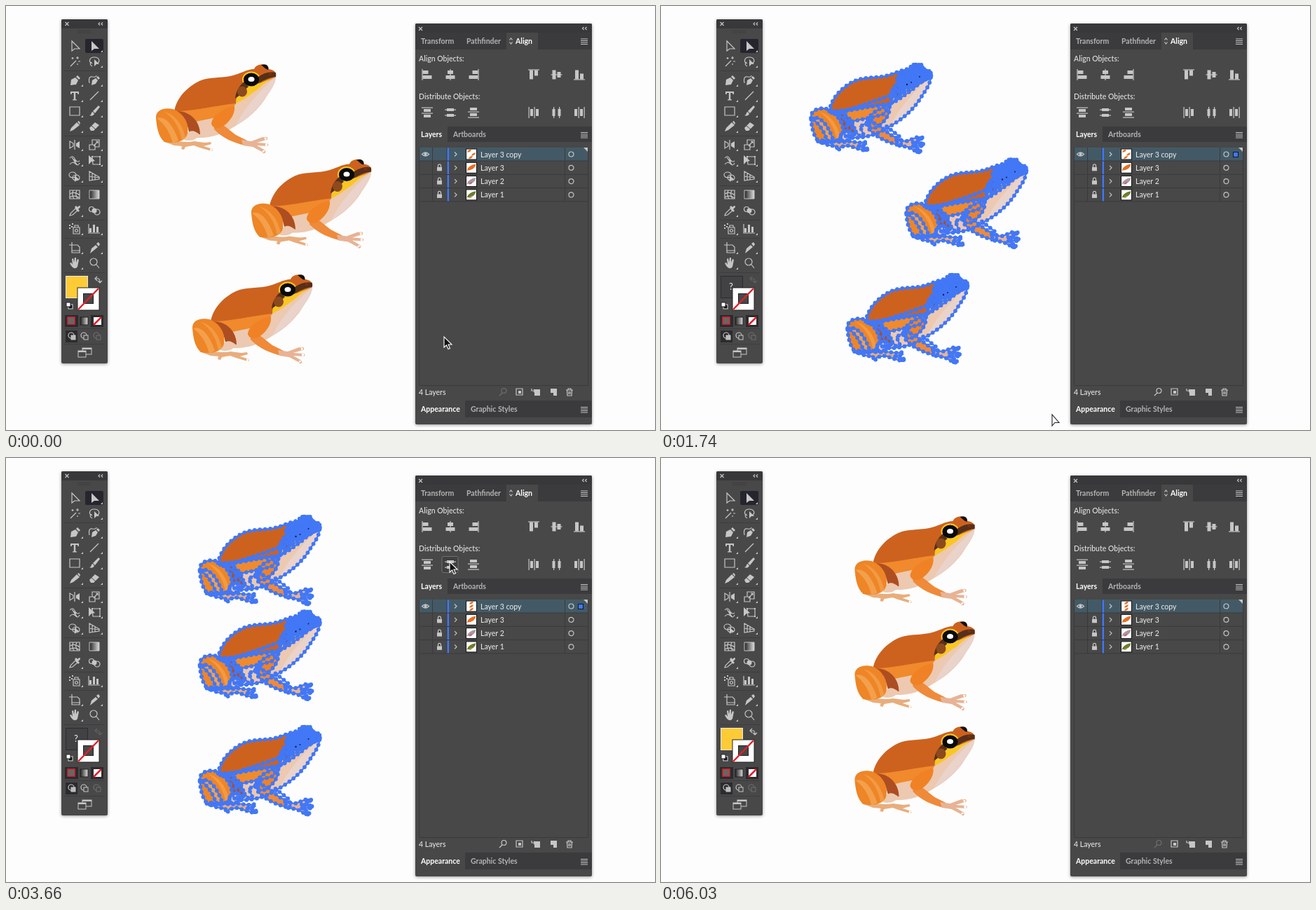
These frames come from a looping animation (926x605 px, 6.06 s). An HTML page:

```html
<!DOCTYPE html>
<html>
<head>
<meta charset="utf-8">
<style>
html, body { margin: 0; width: 100%; height: 100%; overflow: hidden; background: #fdfdfd; }
svg { display: block; }
text { font: 500 10.5px Lato, "Open Sans", sans-serif; fill: #e2e2e2; }
.b { font-weight: 700; }
.line { fill: none; stroke: #c6c6c6; stroke-width: 1.2; }
.solid { fill: #c6c6c6; }
.shadow { filter: drop-shadow(0 1px 2px #0006); }
</style>
</head>
<body>
<svg id="stage" width="926" height="605" viewBox="0 0 926 605"></svg>
<script>
const PANEL = '#484848', BAR = '#3b3b3d', DARK = '#38383a', BLUE = '#4277f6';
const stage = document.getElementById('stage');

const rect = (x, y, w, h, fill, extra = '') => `<rect x="${x}" y="${y}" width="${w}" height="${h}" fill="${fill}" ${extra}/>`;
const path = (d, extra = 'class="line"') => `<path d="${d}" ${extra}/>`;
const text = (x, y, s, extra = '') => `<text x="${x}" y="${y}" ${extra}>${s}</text>`;
const group = (x, y, s, extra = '') => `<g transform="translate(${x} ${y}) ${extra}">${s}</g>`;
const oval = (x, y, rx, ry = rx) => `M${x - rx} ${y}a${rx} ${ry} 0 1 0 ${2 * rx} 0a${rx} ${ry} 0 1 0 ${-2 * rx} 0Z`;
const line = d => path(d);
const solid = d => path(d, 'class="solid"');

// Frog: colour, shape, and whether its outline stays hidden when selected
const frogShapes = [
  ['#ecc9b0', 'M262 150C290 140 330 130 385 100C385 112 376 122 370 132C360 148 344 162 326 172C308 184 290 189 268 188Z'],
  ['#e9d3cb', 'M385 101C385 112 376 122 366 136C356 150 342 162 328 170C338 150 352 130 385 101Z', 1],
  ['#cd621f', 'M240 150C243 134 254 118 276 107C290 101 304 103 320 100C334 97 344 90 354 90C357 82 371 81 375 90C382 91 387 95 385 101C372 108 352 118 340 128L326 141C300 142 268 149 246 154Z'],
  ['#f08a2c', 'M243 150C268 150 300 142 328 139L318 154C300 160 282 162 268 166C260 158 252 154 243 150Z'],
  ['#ad4d22', 'M242 150C262 149 277 164 277 183L262 186C260 168 254 157 242 150Z'],
  ['#ecc9b0', 'M254 191C257 179 265 173 277 184C272 190 264 194 254 191Z'],
  ['#e9ad7c', 'M224 193C240 191 256 196 268 193L284 195L292 194L293 197L282 200L295 204L293 207L276 202L268 199L256 201L254 205L250 204L251 200L240 199Z' + oval(293, 205, 2)],
  ['#ee8526', 'M214 160C213 149 225 144 238 147C252 152 262 166 259 182C256 194 240 197 226 194C217 186 215 172 214 160Z'],
  ['#f3a04c', 'M215 160C226 156 238 168 246 192L238 196C234 180 226 168 215 160Z'],
  ['#f29a44', 'M226 151C240 154 252 168 256 188L251 192C248 174 240 160 226 151Z', 1],
  ['#ef8a3a', 'M297 167C306 164 316 175 328 184L344 192L342 199C326 196 308 188 297 176Z'],
  ['#f08225', 'M326 143C312 144 294 156 293 168C295 176 305 176 312 170C322 162 327 152 326 143Z'],
  ['#e8b394', 'M336 191L350 193L366 187L372 188L371 191L358 195L373 196L373 200L358 199L370 206L367 209L352 201L338 199Z' + oval(371, 189, 2.2) + oval(372, 198, 2.3) + oval(368, 208, 2.3)],
  ['#f9c623', 'M384 101C374 106 366 112 358 120C348 126 340 134 328 139C328 130 331 122 340 116C352 116 366 108 384 101Z'],
  ['#f9c623', oval(350, 105, 13, 11.5)],
  ['#55301a', 'M360 101C368 96 376 93 385 95L385 101C374 102 366 107 359 111Z'],
  ['#55301a', 'M340 108C333 113 328 122 327 132L334 127C338 122 342 119 346 115Z'],
  ['#8d4a1f', oval(337, 122, 7, 7.5)],
  ['#14100e', 'M364 84C372 81 376 87 374 91C370 90 368 87 364 84Z'],
  ['#0b0b0b', oval(350, 105, 11, 9.5)],
  ['#ffffff', oval(350, 104.5, 4.5, 3.5)],
  ['#7c2d18', oval(377, 97, 2.5, 2)]
];
const head = 'M339 104C345 95 352 91 356 90L360 84H371L375 91L385 95L383 103L364 109L348 114L338 113Z';
const innerLines = 'M300 163L284 172L290 186M268 168L284 186M322 172L340 186M230 192L256 192';
const fills = frogShapes.map(([c, d]) => path(d, `fill="${c}"`)).join('');
const outlines = [...frogShapes.filter(s => !s[2]).map(s => s[1]), head, innerLines].map(d => path(d)).join('');
const anchors = `<g fill="none" stroke="${BLUE}" stroke-linecap="round">` +
  [['2.2', 'none'], ['5.8', '0 7.5']].map(([w, dash]) =>
    outlines.replaceAll('class="line"', `stroke-width="${w}" stroke-dasharray="${dash}"`)).join('') + '</g>';
const specks = path(oval(351, 112, 1.2) + oval(357, 109, 1) + oval(369, 101, 1), 'fill="#182040"');
const frogDefs = `<g id="frog">${fills}</g><g id="picked">${fills}${path(head, `fill="${BLUE}"`)}${anchors}${specks}</g>`;

// Tool palette
const arrow = 'M-4-7L7 4H0L-4 7Z';
const box = 'M-7-6H7V6H-7Z';
const nib = 'M-6 7L-5-1L1-4L5 0L2 6ZM2-5L4-7L8-3L6-1Z';
const tools = [
  line(arrow), solid(arrow),
  line('M-6 7L2-1M4-7v4M2-5h4M-3-6v3M-4.5-4.5h3M5 0h3M4 3v2'), line('M-3 3C-9 1-7-6 0-6S9 0 4 3M-4 1q-4 3 1 6') + solid('M0-3L7 4H3L0 7Z'),
  solid(nib), solid('M-4 7L-3 0L2-3L5 0L2 5ZM3-4L5-6L8-3L6-1Z') + line('M-7 4Q-9-6-3-5T3-7'),
  solid('M-6-6H6V-2H4.500L4-4H1.200V5L3 5.500V6.500H-3V5.500L-1.200 5V-4H-4L-4.500-2H-6Z'), line('M-6 6L6-6'),
  line(box), solid('M6-8L8-6L1 3L-2 0ZM-2 1L0 4Q-2 8-7 6Q-4 5-4 2Z'),
  solid('M-7 7L-5 2L3-6L7-2L-2 5ZM4-7L6-8L8-5L7-3Z'), solid('M-7 2L1-6L7-2L-1 6H-5Z') + path('M-4-1L2 4', `stroke="${PANEL}"`),
  line('M-7-5V5L-2 2V-2ZM0-7V7') + solid('M7-5V5L2 2V-2Z'), line('M-7 0H1V7H-7ZM-3 0V-7H7V3H1M-1 2L5-5M2-5H5V-2'),
  line('M-7-3Q-3-8 0-2T7 1M-7 6Q-3 1 1 5T7 4M-4-4L3 6') + solid('M-2-2L3 1L0 4Z'), line('M-3-5H8V6H-2Z') + solid('M-8-7L1 1L-4 2L-8 6Z') + solid('M-4-6h2v2h-2zM7-6h2v2h-2zM7 5h2v2h-2z'),
  line(oval(-3, -2, 5, 4) + oval(2, 2, 5, 4)) + solid('M0-1L7 5H3L0 8Z'), line('M-7-7V6L7 4V1ZM-7 0L7 2M-3-5V5M1-2V5'),
  line(box + 'M-7-1Q0-5 7 1M-7 4Q0 0 7 5M-2-6Q-5 0-1 6M3-6Q0 0 4 6'), path(box, 'fill="url(#shade)" stroke="#c6c6c6"'),
  line('M-7 7L-6 4L1-3L4 0L-3 6Z') + solid('M0-5L2-7L4-5Q8-9 8-5L5-2L7 0L5 2Z'), line(oval(-4, -2, 3.5) + oval(4, 2, 4)) + solid(oval(0, 0, 3.5)),
  line('M-2-2H7V7H-2ZM0-2V-5H5V-2') + line(oval(2.5, 2.5, 2)) + solid('M-8-6h2v2h-2zM-5-4h2v2h-2zM-8-2h2v2h-2zM-4-8h2v2h-2z'), solid('M-7-1h3v6h-3zM-2-6h3v11h-3zM3-3h3v8h-3z') + line('M-8-7V6H8'),
  line('M-4-8V4H8M-8-4H4L7-1V7H-4V4'), solid('M-6 8L-4 1L2-4L5-1ZM3-6L6-8L8-5L6-2Z'),
  solid('M-7 0L-5-1L-3 2L-4-6L-2-7L-1-1L0-8L2-8L2-1L4-6L6-5L4 5Q2 8-1 7Q-4 6-7 0Z'), line(oval(-1, -2, 5) + 'M3 2L7 7')
];
const rows = [57, 79, 106, 128, 150, 172, 198, 220, 243, 269, 292, 318, 345, 367];
const noFlyout = [0, 2, 18, 19, 21, 27];
const toolIcons = tools.map((icon, i) => group(i % 2 ? 126 : 98, rows[i >> 1],
  icon + (noFlyout.includes(i) ? '' : solid('M12 6V9H9Z')))).join('');
const closeMark = (x, y) => line(`M${x - 2.5} ${y - 2.5}l5 5m0-5l-5 5`);
const chevrons = (x, y) => line(`M${x - 1} ${y - 2}l-2 2l2 2m4-4l-2 2l2 2`);
const red = 'stroke="#e3202b" stroke-width="2.5"';

const palette = '<g class="shadow">' + rect(79, 19, 66, 491, PANEL, 'rx="2"') + '</g>' +
  rect(79, 19, 66, 13, DARK, 'rx="2"') + closeMark(87, 25.5) + chevrons(135, 25.5) +
  path('M102 35.500H122M102 38H122', 'stroke="#333" stroke-dasharray="1 1"') +
  [92.5, 185.5, 256.5, 305.5, 331.5, 380.5, 460.5, 482.5].map(y => path(`M83 ${y}H141`, 'stroke="#3d3d3d"')).join('') +
  rect(113, 47, 26, 20, '#25262d', 'rx="2"') + toolIcons +
  `<g id="fillOn">${rect(85.5, 385.5, 31, 31, '#fdcb35', 'stroke="#e8e8e8"')}</g>` +
  `<g id="fillMixed">${rect(85.5, 385.5, 31, 31, '#424244', 'stroke="#2c2c2e"')}${text(97, 405, '?', 'style="font-size:13px"')}</g>` +
  `<g id="swap">${line('M128 389H131Q134 389 134 394M130 386L127 389L130 392M131 392L134 395L137 392')}</g>` +
  rect(102, 402, 31, 32, '#fff', 'stroke="#222"') + rect(110.5, 410.5, 14, 14, PANEL, 'stroke="#222"') + path('M103 433L132 403', red) +
  rect(89, 426, 6, 6, '#111', 'stroke="#ddd"') + rect(86, 423, 6, 6, '#fff', 'stroke="#222"') +
  rect(84, 441, 19, 17, '#2b2b2e') + rect(88, 444, 10, 10, '#666', 'stroke="#e3202b" stroke-width="1.500"') +
  rect(106, 444, 11, 11, 'url(#shade)', 'stroke="#222"') +
  rect(121, 441, 18, 17, '#2b2b2e') + rect(125, 444, 11, 11, '#fff') + path('M125 455L136 444', red) +
  rect(85, 463, 17, 17, '#2b2b2e') +
  [93, 111, 129].map((x, i) => `<g opacity="${i > 1 ? .3 : 1}">${line(oval(x, 470, 4))}${rect(x, 470, 6, 6, i ? PANEL : '#bbb', 'stroke="#c6c6c6"')}</g>`).join('') +
  rect(109, 488, 13, 9, PANEL, 'stroke="#c6c6c6"') + rect(109, 488, 13, 2, '#c6c6c6') +
  rect(103, 492, 11, 9, PANEL, 'stroke="#c6c6c6"') + rect(103, 492, 11, 2, '#c6c6c6');

// Align and layers panel
const alignIcon = (x, y, side, turn) => group(x, y,
  rect(side * 7 - .6, -8, 1.2, 16, '#c6c6c6') +
  [[8, -6], [13, 1]].map(([w, top]) => rect(-w / 2 - side * (w / 2 - 6.5), top, w, 5, '#c6c6c6')).join(''), `rotate(${turn})`);
const spreadIcon = (x, y, side, turn) => group(x, y,
  [-4, 4].map(c => rect(-8, c + side * 3 - .5, 16, 1.2, '#c6c6c6') + rect(-5, c - 2 - side, 10, 4, '#c6c6c6')).join(''), `rotate(${turn})`);
const iconRows = [-1, 0, 1].map(s =>
  alignIcon(634 + s * 33, 98, s, 0) + alignIcon(785.5 + s * 32.5, 98, s, 90) +
  spreadIcon(634 + s * 33, 152, s, 0) + spreadIcon(785.5 + s * 32.5, 152, s, -90)).join('');
const menu = y => line(`M820 ${y - 3}h10m-10 2.500h10m-10 2.500h10m-10 2.500h10`);
const tab = (x, y, s, on) => text(x, y, s, `class="b" ${on ? 'style="fill:#fff"' : 'style="fill:#b4b4b4"'}`);

const thumb = (y, art) => rect(656.5, y - 7.5, 15, 15, '#fff', 'stroke="#111"') + art;
const blob = (x, y, c, k = 1) => path(`M${x - 5 * k} ${y + 3 * k}Q${x - 3 * k} ${y - 3 * k} ${x + 5 * k} ${y - 4 * k}Q${x + 4 * k} ${y + 3 * k} ${x - 5 * k} ${y + 3 * k}Z`, `fill="${c}"`);
const trio = (id, xs) => `<g id="${id}">${xs.map((x, i) => blob(x, 207 + i * 4.6, '#e27025', .6)).join('')}</g>`;
const layerRow = (name, i) => {
  const y = 211.5 + i * 19.3;
  const art = i ? blob(664, y, ['', '#e27025', '#a898a0', '#6b7d2c'][i], 1.3) + (i > 1 ? blob(663, y + 3, i > 2 ? '#c08a50' : '#d0566a', .5) : '')
    : trio('loose', [661, 667, 663]) + trio('stacked', [664, 664, 664]);
  return (i ? '' : rect(589, 202, 241, 19, '#435a66')) +
    path(`M589 ${y + 9.5}H830`, 'stroke="#3a3a3c"') +
    rect(629, y - 9, 3, 18, BLUE) + line(`M640 ${y - 3}l3 3l-3 3`) + thumb(y, art) +
    text(677, y + 4, name) + line(oval(806.5, y, 3.5)) +
    (i ? rect(615, y - 1, 7, 5.5, '#c6c6c6') + line(`M616.500 ${y - 1}v-2a2 2 0 0 1 4 0v2`)
      : line(`M593.500 ${y}Q598.500 ${y - 5} 603.500 ${y}Q598.500 ${y + 5} 593.500 ${y}Z`) + solid(oval(598.5, y, 2)));
};
const layers = ['Layer 3 copy', 'Layer 3', 'Layer 2', 'Layer 1'];

const panel = '<g class="shadow">' + rect(584, 25, 252, 572, PANEL, 'rx="2"') + '</g>' +
  rect(584, 25, 252, 13, DARK, 'rx="2"') + closeMark(591.5, 32.5) + chevrons(825.5, 32) +
  [[38, 24, 714, 45], [172, 22, 584, 46], [563, 24, 584, 71]].map(([y, h, x, w]) =>
    rect(584, y, 252, h, BAR) + rect(x, y, w, h, PANEL)).join('') +
  tab(592, 53.5, 'Transform') + tab(657, 53.5, 'Pathfinder') + tab(727, 53.5, 'Align', 1) +
  line('M718.500 48.500l2-2.500l2 2.500m-4 3l2 2.500l2-2.500') +
  tab(592, 187, 'Layers', 1) + tab(638, 187, 'Artboards') +
  tab(592, 579, 'Appearance', 1) + tab(663, 579, 'Graphic Styles') +
  menu(50) + menu(183.5) + menu(575.5) +
  text(589, 79, 'Align Objects:') + text(589, 132.5, 'Distribute Objects:') +
  `<g id="hover">${rect(-11.5, -11.5, 23, 23, '#404042', 'rx="2" stroke="#707070"')}</g>` + iconRows +
  layers.map(layerRow).join('') +
  path('M608.500 202V279M629 202V279M797.500 202V279M589.500 202V541.500H830.500V202', 'fill="none" stroke="#3a3a3c"') +
  solid('M824 202H830V208Z') +
  `<g id="mark">${rect(816.5, 208.5, 7, 7, BLUE, 'stroke="#101830"')}</g>` +
  text(589, 555, '4 Layers') +
  `<g id="search">${line(oval(710.5, 549, 3.5) + 'M708 552L704 556')}</g>` +
  line('M728 546H737V555H728Z') + solid('M731 549h4v4h-4z') +
  solid('M754 547h8v9h-8z') + line('M750 546v3h5m-2-2l2 2l-2 2') +
  solid('M777 546h9v10h-5v-4h-4z') +
  line('M799 548H809M802 548V546H806V548M800.500 548L801 556H807L807.500 548M803 550V554M805 550V554');

const tip = `<g id="tip">${rect(633, 168, 135, 17, '#c3c3c3', 'stroke="#9a9a9a"')}` +
  text(639.5, 180.5, 'Vertical Distribute Center', 'style="font:11px Liberation Sans,Arial,sans-serif;fill:#222"') + '</g>';

stage.innerHTML = `<defs><linearGradient id="shade"><stop stop-color="#222"/><stop offset="1" stop-color="#ddd"/></linearGradient>${frogDefs}</defs>` +
  '<use id="frog0"/><use id="frog1"/><use id="frog2"/>' +
  '<rect id="marquee" fill="none" stroke="#555" stroke-dasharray="1 1"/>' +
  palette + panel + tip + '<path id="cursor" stroke-width="1.1"/>';

// Motion: time, x, y, linear
const keys = [
  [0, 625, 472], [150, 625, 472], [620, 185, 47], [720, 185, 47], [1230, 552, 506, 1], [1420, 558, 583],
  [1900, 558, 583], [2340, 628, 111], [2500, 632, 96], [3250, 632, 96], [3600, 633, 148],
  [4600, 633, 148], [5130, 543, 141], [5330, 528, 146], [6060, 528, 146]
];
function pointer(t) {
  const i = Math.max(1, keys.findIndex(k => k[0] > t));
  const [a, b] = [keys[i - 1], keys[i]];
  let p = (t - a[0]) / (b[0] - a[0]);
  if (!b[3]) p = p * p * (3 - 2 * p);
  return [a[1] + (b[1] - a[1]) * p, a[2] + (b[2] - a[2]) * p];
}
const $ = id => document.getElementById(id);
const show = (id, on) => $(id).style.display = on ? '' : 'none';
const set = (id, attrs) => { for (const k in attrs) $(id).setAttribute(k, attrs[k]); };

function draw(t) {
  const picked = t >= 1600 && t < 5400, aligned = t >= 2700, spread = t >= 4440;
  const spots = [[0, 0], [136, spread ? 150 : 135.5], [52, 300]];
  spots.forEach(([x, y], i) => set('frog' + i, {
    href: picked ? '#picked' : '#frog', transform: `translate(${aligned ? 62.5 : x} ${y})`
  }));

  const [x, y] = pointer(t);
  const [mx, my] = pointer(Math.max(720, t - 12));
  show('marquee', t > 730 && t < 1600);
  set('marquee', { x: 185.5, y: 47.5, width: Math.max(0, Math.round(mx - 185)), height: Math.max(0, Math.round(my - 47)) });

  const overY = [98, 152].find(cy => Math.abs(y - cy) < 12 && Math.abs(x - 633.5) < 12);
  show('hover', overY);
  set('hover', { transform: `translate(633.5 ${overY || 0})` });
  show('tip', t >= 4050 && t < 4650);
  show('loose', t < 3400);
  show('stacked', t >= 3400);
  show('fillOn', !picked);
  show('fillMixed', picked);
  show('mark', picked);
  set('swap', { opacity: picked ? .2 : 1 });
  set('search', { opacity: picked ? 1 : .3 });

  // Tailless selection arrow over the artboard, system arrow over panels
  show('cursor', t < 5700);
  const onPanel = x > 583;
  set('cursor', {
    d: onPanel ? 'M0 0V15L3.5 12L6 17.5L8.5 16.5L6 11H11Z' : 'M0 0V16L4 11.500H10Z',
    transform: `translate(${x} ${y})`, fill: onPanel ? '#111' : '#fff', stroke: onPanel ? '#fff' : '#222'
  });
}
function tick(now) {
  draw(now % 6060);
  requestAnimationFrame(tick);
}
draw(0);
requestAnimationFrame(tick);
</script>
</body>
</html>
```
